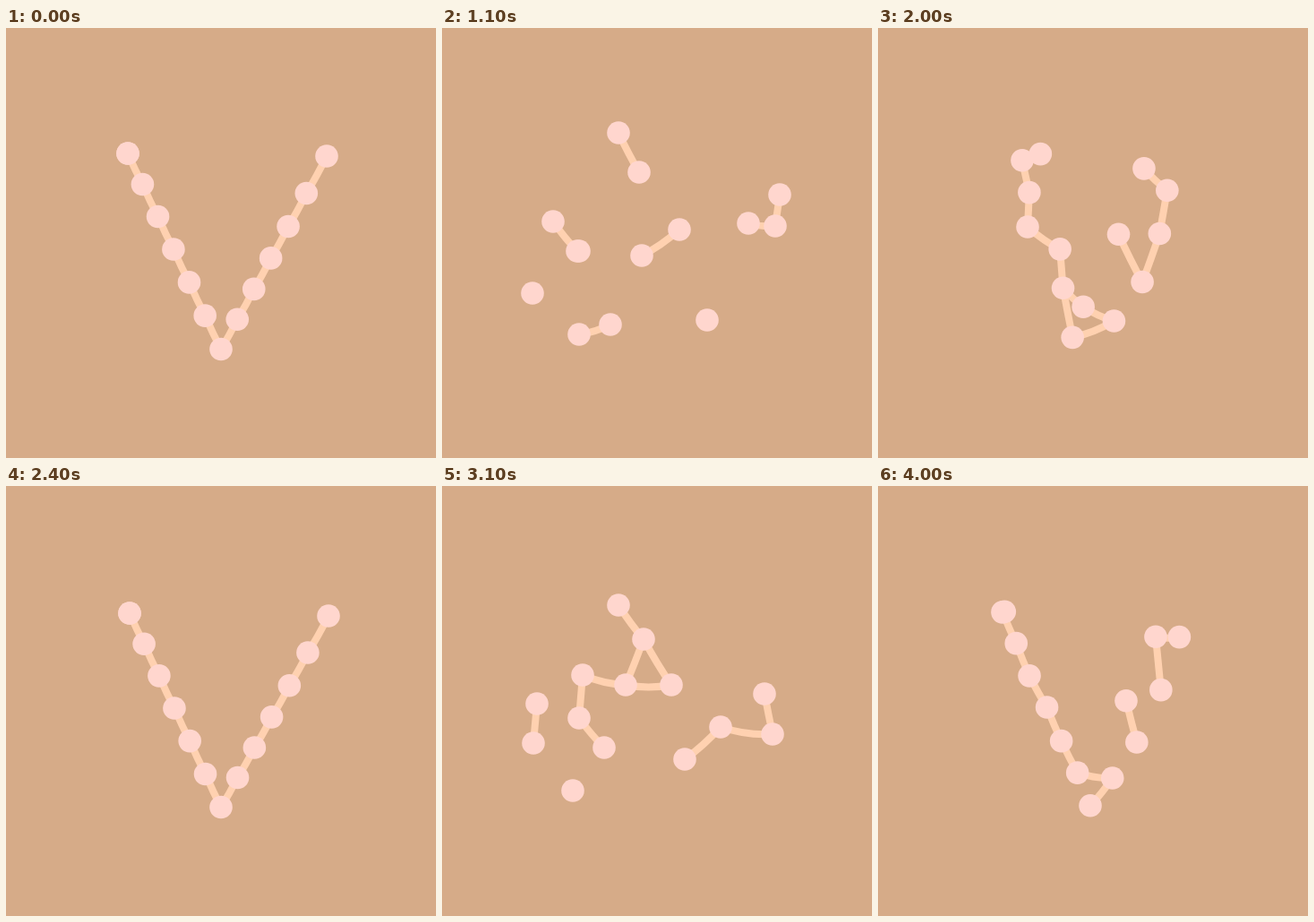
Write an HTML page that moves like this. It is 480 px wide and 480 px high and loops after 4100 ms.

```html
<!DOCTYPE html>
<html lang="en">
<head>
<meta charset="utf-8">
<title>Scattering dots</title>
<style>
  html, body { margin: 0; width: 100%; height: 100%; overflow: hidden; background: #d6ab88; }
  svg { display: block; width: 100vw; height: 100vh; }
</style>
</head>
<body>
<svg viewBox="0 0 480 480">
  <path id="links" fill="none" stroke="#ffd1b0" stroke-width="8" stroke-linecap="round"/>
  <g id="dots" fill="#ffd6ce"></g>
</svg>
<script>
const LOOP = 4100, STEP = 100, REACH = 66, COUNT = 14, TIP = 6;
const CHAIN = 'ab bc cd de ef fg gh hi ij jk kl lm';

const lerp = (a, b, p) => a + (b - a) * p;
const clamp = (v, lo, hi) => Math.min(hi, Math.max(lo, v));

// Dots 0..12 run along the letter; the last one hides behind the first.
const pose = (pairs, place) => ({
  pairs: pairs.split(' '),
  pts: Array.from({ length: COUNT }, (_, n) => place(n))
});
const points = (pairs, ...xy) => pose(pairs, n => [xy[2 * n], xy[2 * n + 1]]);
const slot = n => n % (COUNT - 1);
const depth = n => 1 - Math.abs(n - TIP) / TIP;

const letter = shift => pose(CHAIN, i => {
  const n = slot(i), left = n <= TIP;
  const u = Math.pow(depth(n), left ? 1.03 : 0.92);
  return [lerp((left ? 136 : 358) + shift, 240, u),
          lerp((left ? 140 : 143) + shift, 358.5, u)];
});

// Each dot steps off its arm to one side, further near the tip.
function loosen(from) {
  const sides = '-++-+--++-+-+';
  return pose('ab bc cd de fg hi jk lm', i => {
    const n = slot(i), [x, y] = from.pts[n];
    const angle = (n <= TIP ? -60 + 9 * n : 45) * Math.PI / 180;
    const r = (18 + 10 * depth(n)) * (sides[n] === '+' ? 1 : -1);
    return [x + r * Math.cos(angle), y + r * Math.sin(angle)];
  });
}

// The left arm is nearly home while the right one still lags.
const regroup = (from, to) => pose('ab bc cd de ef fh gh ij kl lm', n => {
  const p = n > TIP && n < COUNT - 1 ? 0.6 : 0.96;
  return from.pts[n].map((v, c) => lerp(v, to.pts[n][c], p));
});

const first = letter(0), second = letter(2);
const loose = loosen(first);
const spread = points('an bc jl ef ik km',
  197,117, 124,216, 151,249, 153,249, 188,331, 153,342, 101,296,
  296,326, 342,218, 223,254, 372,221, 265,225, 377,186, 220,161);
const swirl = points('an nj nl jl bj bd de cg hi ik km',
  197,133, 157,211, 106,243, 153,259, 181,292, 146,340, 102,287,
  271,305, 311,269, 205,222, 369,277, 256,222, 360,232, 225,171);
const gather = points('ab dj jm km ik eg ef',
  210,161, 198,203, 157,245, 228,248, 208,302, 234,296, 165,316,
  267,327, 307,278, 249,214, 317,237, 272,144, 304,207, 268,145);
const home = regroup(gather, first);

const keys = [
  [0, first], [500, loose], [1100, spread], [1300, swirl], [1600, gather], [2200, home],
  [2400, second], [2700, loose], [2900, spread], [3100, swirl], [3400, gather], [4000, home]
];

const linksEl = document.getElementById('links');
const dots = Array.from({ length: COUNT }, () => {
  const c = document.createElementNS('http://www.w3.org/2000/svg', 'circle');
  c.setAttribute('r', 12.8);
  return document.getElementById('dots').appendChild(c);
});

function keyAt(i) {
  const turn = Math.floor(i / keys.length);
  const [time, shape] = keys[i - turn * keys.length];
  return { time: time + turn * LOOP, shape };
}

function glide([k0, k1, k2, k3], n, c, p) {
  const [v0, v1, v2, v3] = [k0, k1, k2, k3].map(k => k.shape.pts[n][c]);
  const span = (k2.time - k1.time) * 0.7;
  const m1 = (v2 - v0) / (k2.time - k0.time) * span;
  const m2 = (v3 - v1) / (k3.time - k1.time) * span;
  const q = p * p, r = q * p;
  return lerp(v1, v2, 3 * q - 2 * r) + (r - 2 * q + p) * m1 + (r - q) * m2;
}

function link([ax, ay], [bx, by]) {
  if (Math.hypot(bx - ax, by - ay) > REACH) return '';
  const sag = Math.abs(bx - ax) * 0.1;
  return `M${ax} ${ay}Q${(ax + bx) / 2} ${(ay + by) / 2 + sag} ${bx} ${by}`;
}

function draw(ms) {
  const t = Math.floor((ms % LOOP) / STEP) * STEP;
  const i = keys.findLastIndex(([time]) => time <= t);
  const k = [-1, 0, 1, 2].map(d => keyAt(i + d));
  const [from, to] = [k[1].shape, k[2].shape];
  const p = (t - k[1].time) / (k[2].time - k[1].time);
  const burst = from === loose ? 20 * Math.sin(Math.PI * p) : 0;

  const pts = dots.map((el, n) => {
    const x = glide(k, n, 0, p), y = glide(k, n, 1, p);
    const push = 1 + burst / (Math.hypot(x - 235, y - 240) || 1);
    const cx = clamp(235 + (x - 235) * push, 97, 378);
    const cy = clamp(240 + (y - 240) * push, 97, 371);
    el.setAttribute('cx', cx);
    el.setAttribute('cy', cy);
    return [cx, cy];
  });

  const pairs = new Set(p ? [...from.pairs, ...to.pairs] : from.pairs);
  const at = ch => pts[ch.charCodeAt(0) - 97];
  linksEl.setAttribute('d', [...pairs].map(s => link(at(s[0]), at(s[1]))).join(''));
}

const start = performance.now();
function tick() {
  draw(performance.now() - start);
  requestAnimationFrame(tick);
}
tick();
</script>
</body>
</html>
```
